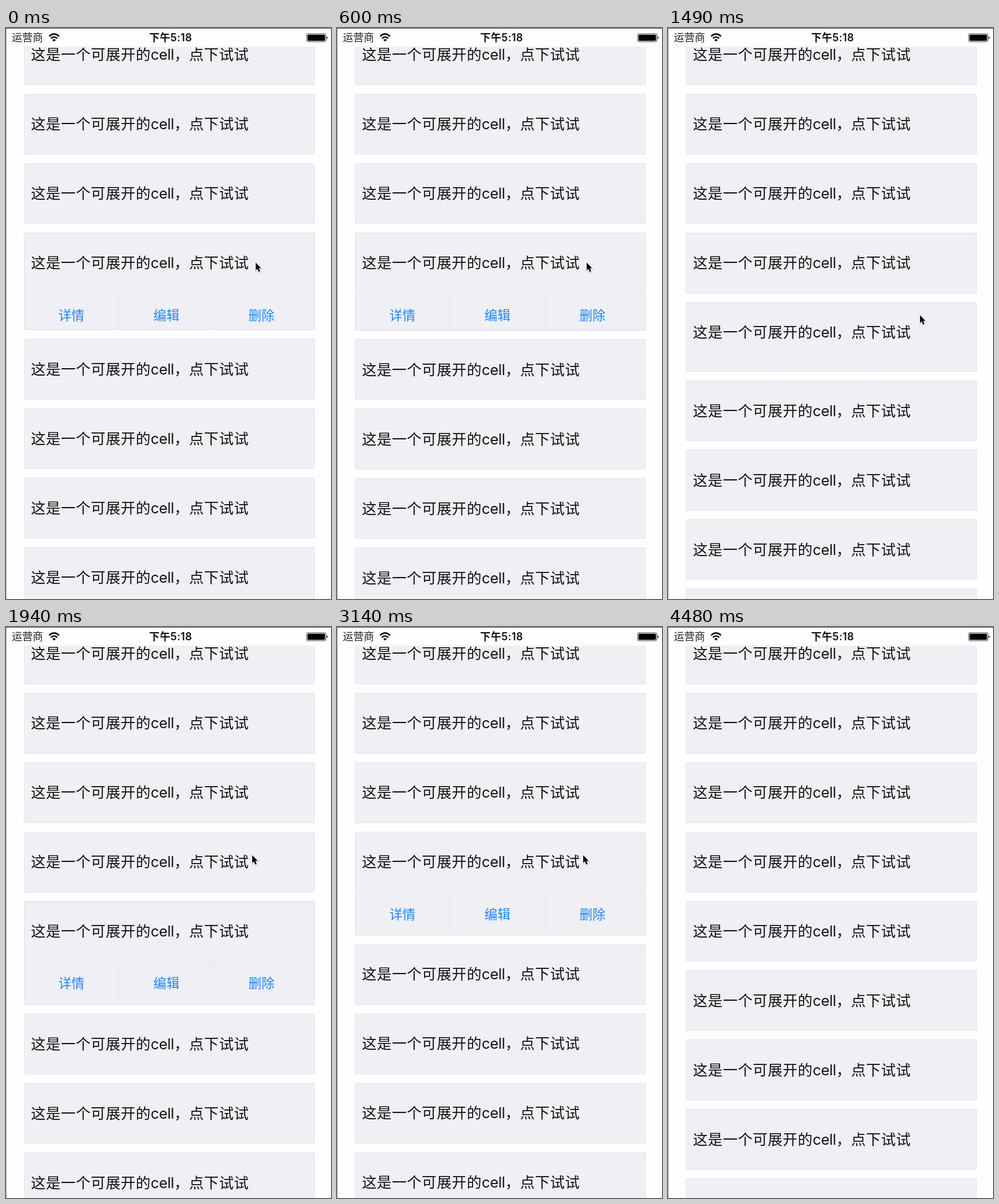
Write an HTML page that moves like this. It is 561 px wide and 987 px high and loops after 4.58 s.

```html
<!DOCTYPE html>
<html lang="zh-CN">
<head>
<meta charset="utf-8">
<title>Expandable cells</title>
<style>
  html, body { margin: 0; width: 100%; height: 100%; overflow: hidden; background: #fefefe; }
  #stage {
    position: relative; width: 561px; height: 987px; overflow: hidden; background: #fefefe; color: #111;
    font-family: Inter, "Noto Sans CJK SC", "Noto Sans CJK", sans-serif;
    white-space: nowrap;
  }
  #stage div, #stage svg, #stage span { position: absolute; }
  .row {
    left: 31px; width: 502px; overflow: hidden;
    background: #f0eff4; box-shadow: inset 0 0 0 1px #e3e3fb;
  }
  .row.open { box-shadow: inset 0 0 0 1px #dddefc; }
  .label { left: 12px; height: 104px; font-size: 25.4px; line-height: 104px; letter-spacing: .45px; }
  .label i { font-style: normal; letter-spacing: -.3px; }
  .actions { left: 0; width: 502px; height: 78px; border-top: 1px solid #dfe6fb; display: none; }
  .open .actions { display: block; }
  .actions span {
    top: 0; width: 163px; height: 78px; box-sizing: border-box; border-right: 1px solid #dbe8fc;
    color: #1c86fb; font-size: 22.4px; line-height: 76px; text-align: center;
  }
  .actions span:last-child { border-color: transparent; }
  #bar { left: 0; top: 0; width: 561px; height: 32px; background: #fefefe; font-size: 18px; line-height: 33px; }
  #carrier { left: 10px; color: #222; }
  #time { left: 247px; font-weight: 600; letter-spacing: .4px; }
  #edge { inset: 0; border: solid #a4a4a4; border-width: 1px 0 0 1px; border-top-color: #444; }
</style>
</head>
<body>
<div id="stage">
  <div id="list"></div>
  <div id="bar">
    <span id="carrier">运营商</span>
    <svg style="left:73px;top:8px" width="20" height="17" fill="none" stroke="#111" stroke-width="2.6">
      <path d="M1.4 6.4Q10 -1.6 18.6 6.4M4.6 10Q10 5 15.4 10"/>
      <path d="M10 15.6L6.9 12.6Q10 10 13.1 12.6Z" fill="#111" stroke="none"/>
    </svg>
    <span id="time">下午5:18</span>
    <svg style="left:517px;top:8px" width="40" height="18">
      <rect x="1.8" y="1.8" width="33.4" height="14" rx="3.2" fill="#fff" stroke="#858585" stroke-width="1.5"/>
      <rect x="3.4" y="3.4" width="30.2" height="10.8" rx="1.6" fill="#000"/>
      <path d="M36.2 6.2Q38.6 7 38.6 8.8T36.2 11.4Z" fill="#555"/>
    </svg>
  </div>
  <div id="edge"></div>
  <svg id="cursor" style="left:0;top:0" width="16" height="22">
    <path d="M2 2V15L5 12.3L7.2 17.6L9.7 16.5L7.5 11.4H11.5Z" transform="translate(0 1)"
      fill="none" stroke="#000" stroke-opacity=".16" stroke-width="2.4"/>
    <path d="M2 1.5V14.8L5 12.2L7.2 17.4L9.6 16.4L7.5 11.3H11.5Z"
      fill="#000" stroke="#fff" stroke-width="1.6" stroke-linejoin="round" paint-order="stroke"/>
  </svg>
</div>
<script>
const LOOP = 4580, FULL = 74.9, FIRST = 3, SECOND = 4;

// [time, value...]: each value holds until the next step
const firstOpen = [[0, 63.9], [150, FULL], [600, 64.9], [740, 6], [890, 0],
  [2240, 19], [2390, 72], [2540, FULL], [3140, 74.4], [3280, 25], [3430, 0]];
const secondOpen = [[0, 0], [1490, 16], [1640, 72], [1790, FULL],
  [2240, FULL - 19], [2390, FULL - 72], [2540, 0]];
const pointer = [[0, 431, 405], [890, 434, 474], [1040, 435, 496], [1640, 431, 462],
  [1790, 423, 397], [1940, 425, 394], [3580, 390, 591], [3730, 433, 859],
  [3880, 498, 953], [4030, 518, 986], [4180, 518, 1010]];

const list = document.getElementById('list');
const cursor = document.getElementById('cursor');
const at = (steps, t) => steps.findLast(s => s[0] <= t);

const rows = Array.from({ length: 9 }, () => {
  const el = document.createElement('div');
  el.className = 'row';
  el.innerHTML = '<div class="label">这是一个可展开的<i>cell</i>，点下试试</div><div class="actions">' +
    ['详情', '编辑', '删除'].map((s, k) => `<span style="left:${1 + k * 164}px">${s}</span>`).join('') + '</div>';
  list.append(el);
  return { el, label: el.children[0], actions: el.children[1] };
});

function draw(t) {
  let shift = 0;
  rows.forEach(({ el, label, actions }, i) => {
    const y = 119.9 * i - 6.1 + shift;
    const open = i === FIRST ? at(firstOpen, t)[1] : i === SECOND ? at(secondOpen, t)[1] : 0;
    const top = Math.round(y);
    const fold = Math.round(y + 103.9);
    el.style.top = top + 'px';
    el.style.height = Math.round(y + 103.9 + open) + 1 - top + 'px';
    el.classList.toggle('open', open > 0);
    label.style.top = Math.round(120 * i - 6 + shift) - top + 'px';
    actions.style.top = fold - top + 'px';
    shift += open;
  });
  const [, x, y] = at(pointer, t);
  cursor.style.transform = `translate(${x - 2}px, ${y - 1}px)`;
}

const start = performance.now();
function tick() {
  draw((performance.now() - start) % LOOP);
  requestAnimationFrame(tick);
}
draw(0);
requestAnimationFrame(tick);
</script>
</body>
</html>
```
